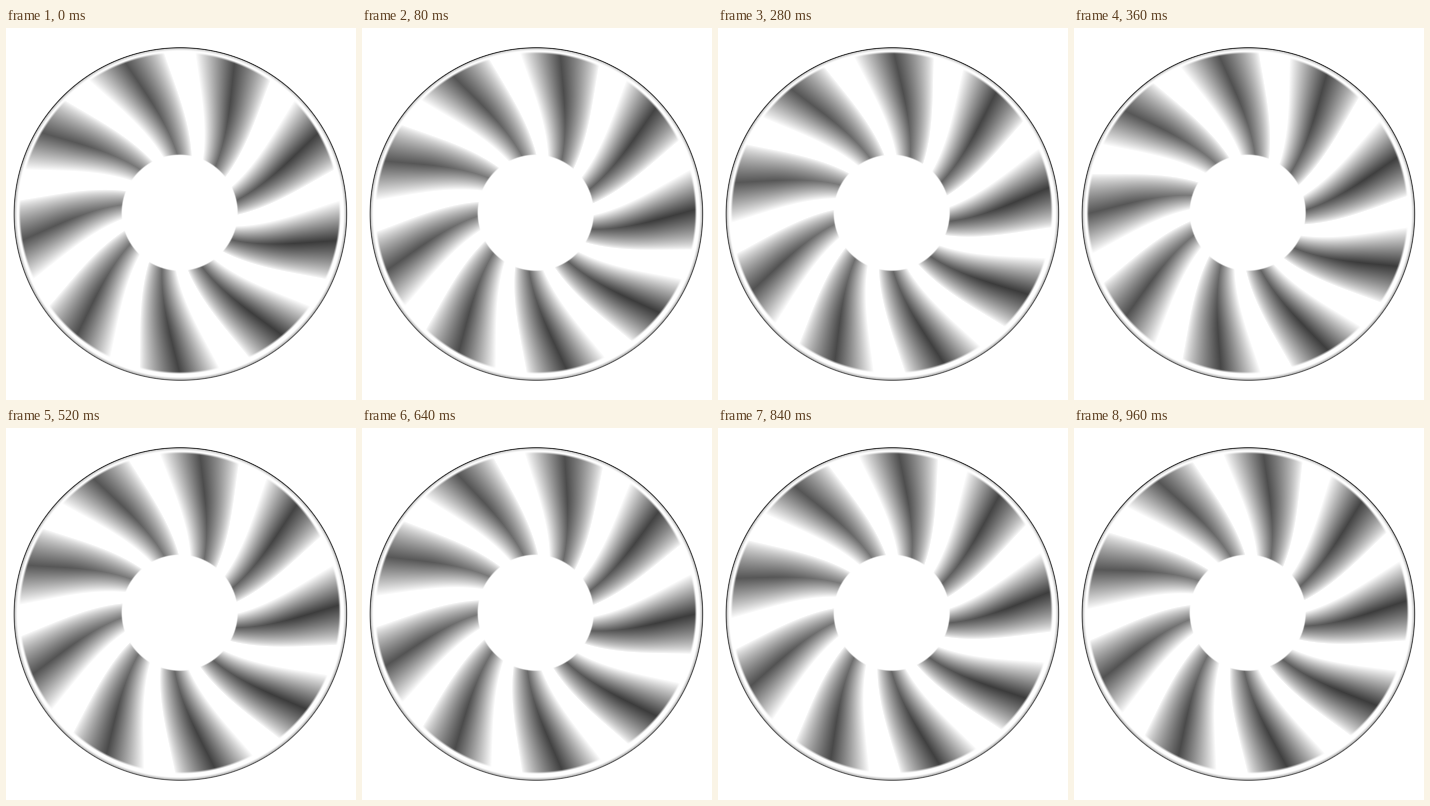
An HTML page with a canvas that plays this animation: 350 px wide and 372 px high, repeating every 1 s.

```html
<!DOCTYPE html>
<html lang="en">
<head>
<meta charset="utf-8">
<title>Spinning wheel</title>
<style>
html, body { margin: 0; width: 100%; height: 100%; overflow: hidden; background: #fff; }
canvas { display: block; width: 350px; height: 372px; }
</style>
</head>
<body>
<canvas id="stage" width="350" height="372"></canvas>
<script>
const W = 350, H = 372;
const RIM = { x: 174.4, y: 186, r: 167 };
const FAN = { x: 173.7, y: 184.7, inner: 58, outer: 160.6 };
const PITCH = 40, HALF = 14.5, START = 10;
const LOOP = 1000, STEP = 40;

const ctx = document.getElementById('stage').getContext('2d');
const img = ctx.createImageData(W, H);
const px = new Uint32Array(img.data.buffer).fill(0xffffffff);

const clamp = v => Math.max(0, Math.min(1, v));
const ramp = (a, b, v) => {
  const t = clamp((v - a) / (b - a));
  return t * t * (3 - 2 * t);
};
const cosDeg = a => Math.cos(a * Math.PI / 180);
const gray = v => {
  const g = Math.round(Math.max(0, Math.min(255, v)));
  return (0xff000000 | g << 16 | g << 8 | g) >>> 0;
};
const polar = (c, x, y) => {
  const dx = x + 0.5 - c.x, dy = y + 0.5 - c.y;
  return [Math.hypot(dx, dy), Math.atan2(dy, dx) * 180 / Math.PI];
};

// Angular lag of a blade's dark crease at radius r
function sweep(r) {
  const t = (155 - r) / 98;
  return 0.5 + 9 * t + 8.5 * t * t;
}

// The rim stays still: a white bevel, a soft gray edge and a thin outline
function rimTone(r, angle) {
  const top = (1 + cosDeg(angle + 90)) / 2;
  const soft = (90 - 30 * top) * ramp(162.5, 167, r);
  const line = (70 + 70 * top) * clamp(1.3 - Math.abs(r - 166.3) / 0.8);
  return (soft + line) * clamp(RIM.r + 0.4 - r);
}

// Per-pixel blade angle and strength, kept for the moving part
const cells = [];
for (let y = 0; y < H; y++) {
  for (let x = 0; x < W; x++) {
    const i = y * W + x;
    const [rimR, rimAngle] = polar(RIM, x, y);
    if (rimR > RIM.r + 1) continue;
    const base = 255 - rimTone(rimR, rimAngle);
    px[i] = gray(base);

    const [r, angle] = polar(FAN, x, y);
    const mask = ramp(FAN.inner - 1, FAN.inner + 1, r) * (1 - ramp(FAN.outer - 2, FAN.outer + 1, r));
    if (!mask) continue;
    const depth = 148 + 34 * ramp(FAN.inner, 125, r) + 14 * cosDeg(angle - 25);
    cells.push([i, base, angle - sweep(r) - START, mask * depth]);
  }
}

// Blade darkness by angle from the crease; the leading side falls off later
function shade(m) {
  const lead = m < PITCH / 2;
  const d = lead ? m : PITCH - m;
  return d < HALF ? Math.pow(1 - d / HALF, lead ? 0.75 : 0.92) : 0;
}

function draw(turn) {
  for (const [i, base, a, depth] of cells) {
    const m = (((a - turn) % PITCH) + PITCH) % PITCH;
    px[i] = gray(base - depth * shade(m));
  }
  ctx.putImageData(img, 0, 0);
}

let last = -1;
function tick() {
  const step = Math.floor(performance.now() % LOOP / STEP);
  if (step !== last) {
    last = step;
    draw(step * STEP / LOOP * 360);
  }
  requestAnimationFrame(tick);
}
tick();
</script>
</body>
</html>
```
